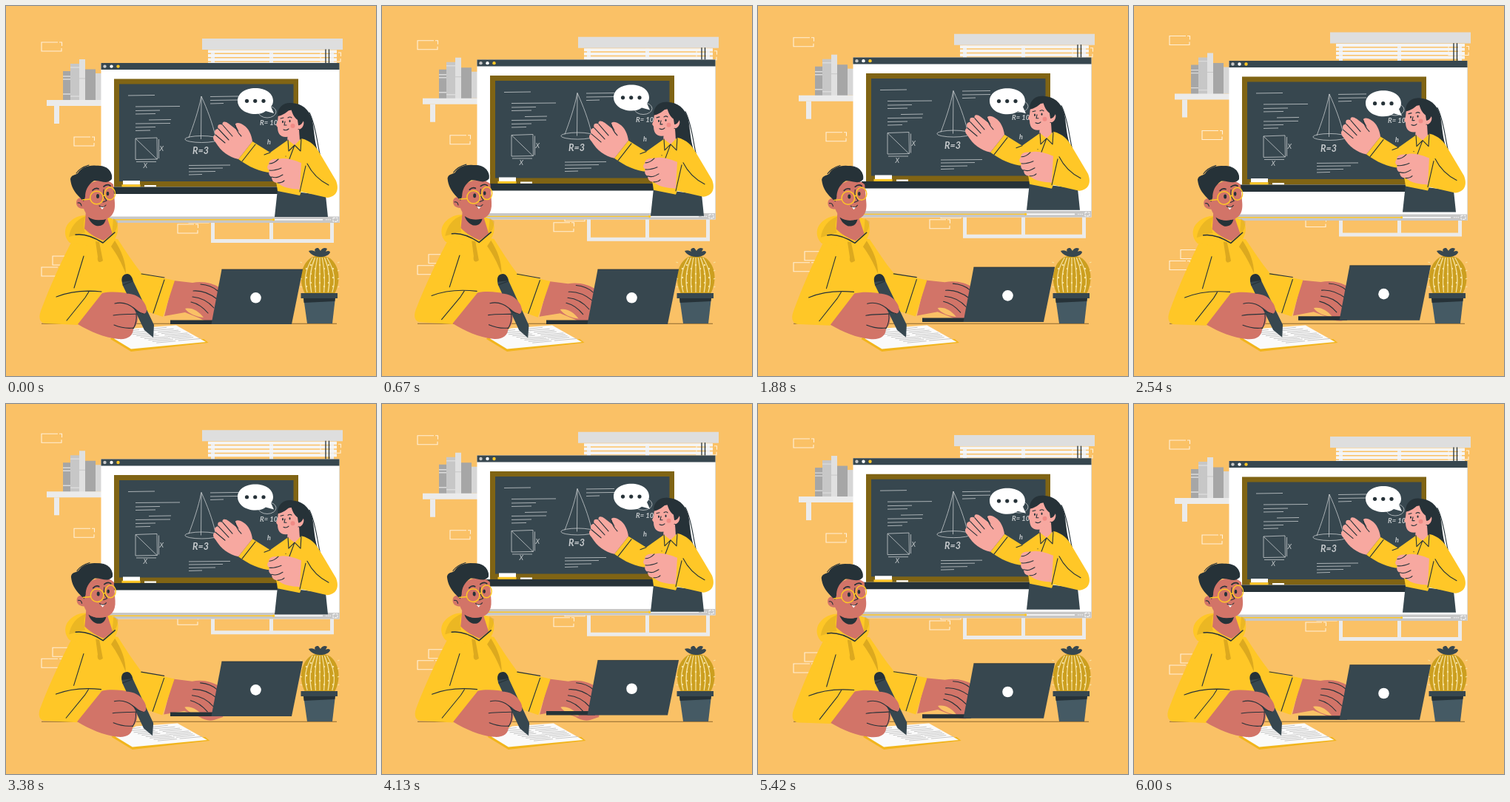
Write an HTML page that moves like this. It is 500x500 px and loops after 6.04 s.

```html
<!DOCTYPE html>
<html lang="en">
<head>
<meta charset="utf-8">
<title>Online lesson</title>
<style>
html, body { margin: 0; width: 100%; height: 100%; overflow: hidden; background: #fac166; }
svg { display: block; width: 100vw; height: 100vh; }
.line { fill: none; stroke: #263238; stroke-width: 1.1; stroke-linecap: round; stroke-linejoin: round; }
.chalk { fill: none; stroke: #fff; stroke-width: .8; opacity: .72; }
.chalk text { fill: #fff; stroke: none; font-family: Lato, "Open Sans", sans-serif; font-style: italic; }
.brick { fill: none; stroke: #fff0d8; stroke-width: 1.1; }
.dark { fill: #263238; }
.slate { fill: #37474f; }
.yellow { fill: #ffc727; }
.mustard { fill: #cc9f1f; }
.tan { fill: #d27468; }
.pink { fill: #f7a8a0; }
</style>
</head>
<body>
<svg viewBox="0 0 500 500">
  <rect width="500" height="500" fill="#fac166"/>

  <g id="wall">
    <g id="bricks" class="brick"></g>
    <rect x="77" y="88" width="10" height="40" fill="#a6a6a6"/>
    <rect x="87" y="78" width="12" height="50" fill="#c7c7c7"/>
    <rect x="99" y="72" width="8" height="56" fill="#e0e0e0"/>
    <rect x="107" y="85.500" width="14" height="42" fill="#a6a6a6"/>
    <rect x="121" y="91" width="9" height="36" fill="#d6d6d6"/>
    <path d="M77 95h10M77 99h10M77 119h10M87 83h12M87 122h12" stroke="#dbdbdb" stroke-width="1.300"/>
    <path d="M99 98h8" stroke="#c7c7c7"/>
    <path d="M55 127h80v8H55z" fill="#ebebeb"/>
    <path d="M65 135h7v24h-7z" fill="#ebebeb"/>
    <path d="M279.500 60v257.500h161V60M358.500 60v257" fill="none" stroke="#ebebeb" stroke-width="5"/>
    <path d="M273 61.500h174M273 67h174M273 72.500h174M273 78h174" stroke="#f5f5f5" stroke-width="4"/>
    <path d="M265 44h190v15H265z" fill="#dedede"/>
    <path d="M432 59v24M436.500 59v24" class="line" style="stroke-width:1.300"/>
  </g>

  <g id="screen">
    <path d="M128.500 77h322v216h-322z" fill="#fff"/>
    <path d="M450.500 86v206" stroke="#dcdcdc"/>
    <path d="M128.500 77h322v9h-322z" class="slate"/>
    <circle cx="133.500" cy="81.600" r="2.200" fill="#c7c7c7"/>
    <circle cx="142.500" cy="81.600" r="2.200" fill="#fff"/>
    <circle cx="151.500" cy="81.600" r="2.200" class="yellow"/>
    <path d="M128.500 284.500h322v8.500h-322z" fill="#c7c7c7"/>
    <path d="M136 288.800h226" stroke="#ffc727" stroke-width="1.400"/>
    <path d="M363 288.800h65" stroke="#fff" stroke-width="1.600"/>
    <circle cx="361.500" cy="288.800" r="1.700" class="yellow"/>
    <path d="M432 288.800h7" stroke="#fff" stroke-dasharray="1.500 1.200"/>
    <path d="M442 286.300h6v5h-6z" fill="none" stroke="#fff" stroke-dasharray="3 1"/>

    <path d="M146 98.500h249v146H146z" fill="#806414"/>
    <path d="M153 105.500h235.500v131.500H153z" class="slate"/>
    <path d="M140 244.500h227v9.500H140z" class="dark"/>
    <path d="M158 236h23v5.500h-23zM187 242h16v2.300h-16z" fill="#fff"/>
    <path d="M156.500 241.300h25v3h-25z" class="yellow"/>

    <g class="chalk">
      <path id="notes"/>
      <path d="M175 179l29-1 .5 29-29.500.5zM175 179l29 28M206.500 180v26M176 210.500h27"/>
      <path d="M264 122c-4 20-11 40-17 56M264 122c8 18 15 36 19 54M264 122l-.5 58"/>
      <ellipse cx="264.500" cy="180" rx="22.500" ry="4.500"/>
      <ellipse cx="353" cy="143" rx="12" ry="8"/>
      <text x="252" y="200" font-size="12.500" font-weight="bold">R=3</text>
      <text x="343" y="161.500" font-size="9.500" font-weight="bold">R= 10</text>
      <text x="353" y="187" font-size="9" font-weight="bold">h</text>
      <text x="207.500" y="196.500" font-size="9">X</text>
      <text x="185.500" y="219" font-size="9">X</text>
    </g>
  </g>

  <g id="bubble">
    <path d="M337 111c14 0 24 7 24 17 0 3-1 6-3 8l4 9-11-3c-4 3-9 4-14 4-14 0-24-8-24-18s10-17 24-17z" fill="#fff"/>
    <g class="dark"><circle cx="325.500" cy="128.300" r="2.600"/><circle cx="336.700" cy="128.300" r="2.600"/><circle cx="348" cy="128.300" r="2.600"/></g>
  </g>

  <g id="teacher">
    <path d="M367 146c1-10 9-16 18-15 14 0 25 8 29 24 3 14 2 32 11 50l-4 5-30-15 4-40z" class="dark"/>
    <path d="M410 144c9 18 10 40 15 60" class="line"/>
    <path d="M367 248l65 8 3 29h-72z" class="slate"/>
    <path d="M381 168l15-1 1 15-7 10-10-8z" class="pink"/>
    <path d="M368 147c5-4 14-6 21-7 4 3 6 8 7 14 6-3 8 4 5 9-2 3-4 4-6 3-3 6-9 11-17 11-8 0-11-6-11-13l-2-3 2-5z" class="pink"/>
    <path d="M367 149c6-1 14-5 18-12 1 8 5 14 9 17l1 7c5 2 12-13 9-20l-18-10c-10 0-18 7-19 18z" class="dark"/>
    <g class="dark"><ellipse cx="374" cy="156.500" rx="1" ry="1.700"/><ellipse cx="383.500" cy="155.500" rx="1" ry="1.700"/></g>
    <path d="M371 152l4-1M381 151q3-2 5 0M377 156l-1 5 3 0M375 167q4 2 7-1" class="line"/>
    <circle cx="387.500" cy="162" r="3" fill="#f08b86"/>
    <path d="M333 183l24 15 24-17 9 7 9-9c13 3 20 11 25 20l22 37c5 13 0 22-12 23l-35-8-2 5-30-6c-1-9-3-17-5-25-17 1-34-8-48-18z" class="yellow"/>
    <path d="M381 181l1 15 8-8 8 8 1-17M390 188l-9 24M405 216l-8 35M407 213c6 12 15 22 29 29M337 187l-18 23M357 198l-8 3M378 203h.1M376 209h.1" class="line"/>
    <path d="M333 183c-1-8-5-18-12-22-5-4-12-4-11 0l5 9-14-11c-5-4-10-3-8 2-6-3-8 1-6 5-5 0-6 4-4 8-4 1-4 6 0 10 8 13 18 20 31 23z" class="pink"/>
    <path d="M293 161l13 15M287 166l14 15M283 174l13 11M310 161q1 8 8 15" class="line"/>
    <path d="M399 212c-10-4-22-8-31-5-9-1-13 2-13 7-3 3-2 6 1 8-2 4 0 8 3 9 0 5 3 8 8 8 8 7 18 8 30 9z" class="pink"/>
    <path d="M368 207c-4 4-8 6-12 6M356 222c6 1 11-1 16-3M359 231c6 2 10 0 15-3M367 239q6 0 9-3" class="line"/>
  </g>

  <path d="M48 429.300h399" stroke="#8b672d" stroke-width="1.100"/>

  <g id="cactus">
    <path d="M404 389c-9-18-6-38 7-48 9-5 19-4 27 0 13 10 15 31 6 48z" class="mustard"/>
    <g id="ribs" fill="none" stroke="#f6e2a0" stroke-width="1.200"></g>
    <path d="M424 339c-7 0-13-4-15-8 4-2 8 0 9 1-2-3 0-5 4-5l3 4c2-4 6-5 9-3l-2 4c3-2 6-1 6 1-2 4-7 6-14 6z" class="slate"/>
    <path d="M402 394h43l-4 35h-34z" fill="#455a64"/>
    <path d="M402 394h43l-.7 5-41.700 2z" class="dark"/>
    <path d="M398.500 388h49.500v7h-49.500z" class="slate"/>
  </g>

  <g id="paper">
    <path d="M141 450l28 17 104.500-12-6-5-97 8-25-13z" fill="#f1b51c"/>
    <path d="M146 449.500l28-14 56-4 40 22.500-101 9.500z" fill="#fafafa"/>
    <path id="scribbles" fill="none" stroke="#b8b8b8" stroke-width=".8"/>
  </g>

  <g id="student">
    <path d="M226 371l26 3c14-3 28 1 36 6l6 10v32l-12 4c-6 2-14 0-20-4l-20-8-28 5z" class="tan"/>
    <path d="M242 409c9-2 18 3 25 12-10-1-20-5-25-12z" fill="#fac166"/>
    <path d="M253 385c13-1 23 4 32 11M252 393c12 1 22 7 29 15M250 400c9 2 17 8 23 15M263 376q14 1 23 9" class="line"/>
    <path d="M94 308c-18 34-34 69-47 104-4 11 0 17 7 17l43 2 33-35 58 16 24 8 16-49-45-10c-12-15-22-31-32-46z" class="yellow"/>
    <path d="M107 283c-11 0-20 6-25 14-4 8-2 17 4 23l44 7 17-12c5-8 6-18 1-25-8-6-24-6-41-7z" class="yellow"/>
    <path d="M108 277l-2 24c8 8 17 13 26 16l12-9-8-24z" class="tan"/>
    <path d="M85 312c2-13 10-24 23-28-4 8-3 16-1 22zM145 287l6 4c0 8-3 15-8 19z" class="mustard" opacity=".4"/>
    <path d="M94 309c14-2 26 4 37 11l16-14" class="line" style="stroke-width:1.500"/>
    <path d="M121 318l5 1 5 25c-6 5-8 0-7-5zM147 317c9 14 15 28 15 45-6-15-12-26-20-37z" fill="#dca91f"/>
    <path d="M105 338l-13 43M68 393c20-8 41-9 61-7M112 386l-5 8-25 31M214 370l-15 45M183 362l31 5" class="line"/>
    <path d="M111 285c7 5 15 5 24 3-2 8-7 10-13 9-5-2-9-6-11-12z" class="dark"/>
    <path d="M104 248c14-15 32-16 41-7l2 25c1 15-6 23-21 23-12 0-18-7-21-15-6 0-10-3-10-8 0-6 5-8 9-5z" class="tan"/>
    <path d="M105 264l-5-5c-8-8-12-15-13-25 1-6 6-5 10-8 5-9 17-12 29-10 11 1 19 9 17 18-7 8-15 1-24 2-9 6-12 14-12 22z" class="dark"/>
    <path d="M118 217c14-3 25 3 24 16M95 226c4-6 10-9 17-11M97 266q4-1 5 4" class="line"/>
    <g class="dark"><ellipse cx="124" cy="257" rx="2" ry="3"/><ellipse cx="137.500" cy="253.500" rx="1.800" ry="2.800"/></g>
    <path d="M117 249q4-4 8-2M132 244q5-4 9-1" class="line" style="stroke-width:1.700"/>
    <path d="M132 248c-1 7 0 10 4 15l-5 2M126 270q5 4 9-1" class="line"/>
    <path d="M127 271q4 2 6 0l-3 4z" fill="#fff"/>
    <g fill="none" stroke="#ffc727" stroke-width="1.500"><circle cx="122.500" cy="259" r="8.800"/><ellipse cx="140.500" cy="253.500" rx="7" ry="8.500"/><path d="M131 257l3-2M114 261l-11 1"/></g>

    <path d="M130 388c13-3 27-1 40 1 12 5 20 15 20 23 0 5-6 5-12 4 1 8-1 16-6 20 0 10-8 15-20 14-20-2-38-10-55-20z" class="tan"/>
    <path d="M158 378c-3-8-1-14 6-15 5 0 7 4 8 9l28 59-1 17-12-10z" class="slate"/>
    <path d="M158 377l13-5" class="line"/>
    <path d="M157 373c-2-7 2-11 7-11 4 0 6 4 7 9z" class="dark"/>
    <path d="M156 389c14-2 26 3 32 14 4 8 2 14-4 13-6-4-10-9-20-13z" class="tan"/>
    <path d="M147 402c12-3 23 2 30 11l9 3M145 418c12-2 21-1 32-2M146 431c10 4 18 5 26 4M176 416c1 8-1 15-4 20" class="line"/>
  </g>

  <g id="laptop">
    <path d="M222 424.500h66v5.500h-66z" class="dark"/>
    <path d="M291.500 356H401l-15 74H277.500z" class="slate"/>
    <path d="M291.500 356H401" stroke="#263238" stroke-width=".8"/>
    <circle cx="337.500" cy="394.300" r="7.300" fill="#fff"/>
  </g>
</svg>
<script>
const LOOP = 6040;
const get = id => document.getElementById(id);

// Static details built from short rules
const bricks = [[48, 49], [92, 177], [232, 295], [247, 281], [63, 338], [48, 353], [425, 63]];
get('bricks').innerHTML = bricks.map(([x, y]) =>
  `<path d="M${x + 22} ${y}H${x}v12h27v-4M${x + 24} ${y}h3.500v5"/>`).join('');

const noteLines = [
  [165, 121, 36], [175, 136, 60], [175, 141.5, 33], [175, 146, 27],
  [175, 159, 47], [175, 164, 27], [175, 168.5, 20], [193, 154, 30],
  [276, 122.5, 38], [276, 127.5, 38], [276, 132, 18],
  [247, 215.5, 56], [247, 219.5, 46], [247, 224, 36], [247, 228, 18]
];
get('notes').setAttribute('d', noteLines.map(([x, y, w]) => `M${x} ${y}l${w}-.500`).join(''));

let scribbles = '';
for (let i = 0; i < 9; i++) {
  const x = 174 + i * 4.6 - (i < 2 ? 4 : 0), y = 437 + i * 1.9;
  scribbles += `M${x - 14 + i * .8} ${y + 3}l${24 + (i * 7) % 9}-2.500M${x + 22} ${y}l${25 + (i * 5) % 7}-2.700`;
}
get('scribbles').setAttribute('d', scribbles);

let ribs = '';
for (let i = -3; i <= 3; i++) {
  const bulge = 424 + i * 7.2;
  ribs += `<path d="M${424 + i * 3.2} 340Q${bulge + i} 364 ${424 + i * 5.6} 387"/>`;
  for (let j = 0; j < 3; j++)
    ribs += `<circle cx="${424 + i * 6}" cy="${350 + j * 12 + Math.abs(i) % 2 * 5}" r=".600"/>`;
}
for (const side of [-1, 1])
  for (let j = 0; j < 4; j++)
    ribs += `<path d="M${424 + side * 24} ${347 + j * 11}l${side * 2.5}-1"/>`;
get('ribs').innerHTML = ribs;

// Motion
function floatY(t, period, delay = 0) {
  if (t < delay) return 0;
  const p = (t - delay) % period / period;
  return -10 * (1 - Math.abs(1 - 2 * p));
}

function through(points, t) {
  const i = points.findIndex(p => p[0] >= t);
  if (i < 0) return points[points.length - 1][1];
  if (i === 0) return points[0][1];
  const [t0, a] = points[i - 1], [t1, b] = points[i];
  return a + (b - a) * (t - t0) / (t1 - t0);
}

const sway = [[0, 0], [750, 1], [2250, -1], [3000, 0]];
const bob = [[0, 0], [750, -5], [2550, 3.4], [3000, 0]];
const slide = [[0, 0], [1000, 0], [1800, -2], [2500, 1.8], [4900, 1.8], [6000, .3]];

function move(id, x, y) {
  get(id).setAttribute('transform', `translate(${x} ${y})`);
}

function draw(t) {
  move('wall', 0, floatY(t, 6000));
  move('screen', 0, floatY(t, 3000));
  move('teacher', 0, floatY(t, 3000, 500));
  move('laptop', 0, floatY(t, 6000, 1000));
  move('bubble', 0, through(bob, t % 3000));
  move('paper', through(slide, t), 0);
  get('student').setAttribute('transform', `rotate(${through(sway, t % 3000)} 168 333)`);
}

const start = performance.now();
function tick() {
  draw((performance.now() - start) % LOOP);
  requestAnimationFrame(tick);
}
draw(0);
requestAnimationFrame(tick);
</script>
</body>
</html>
```
